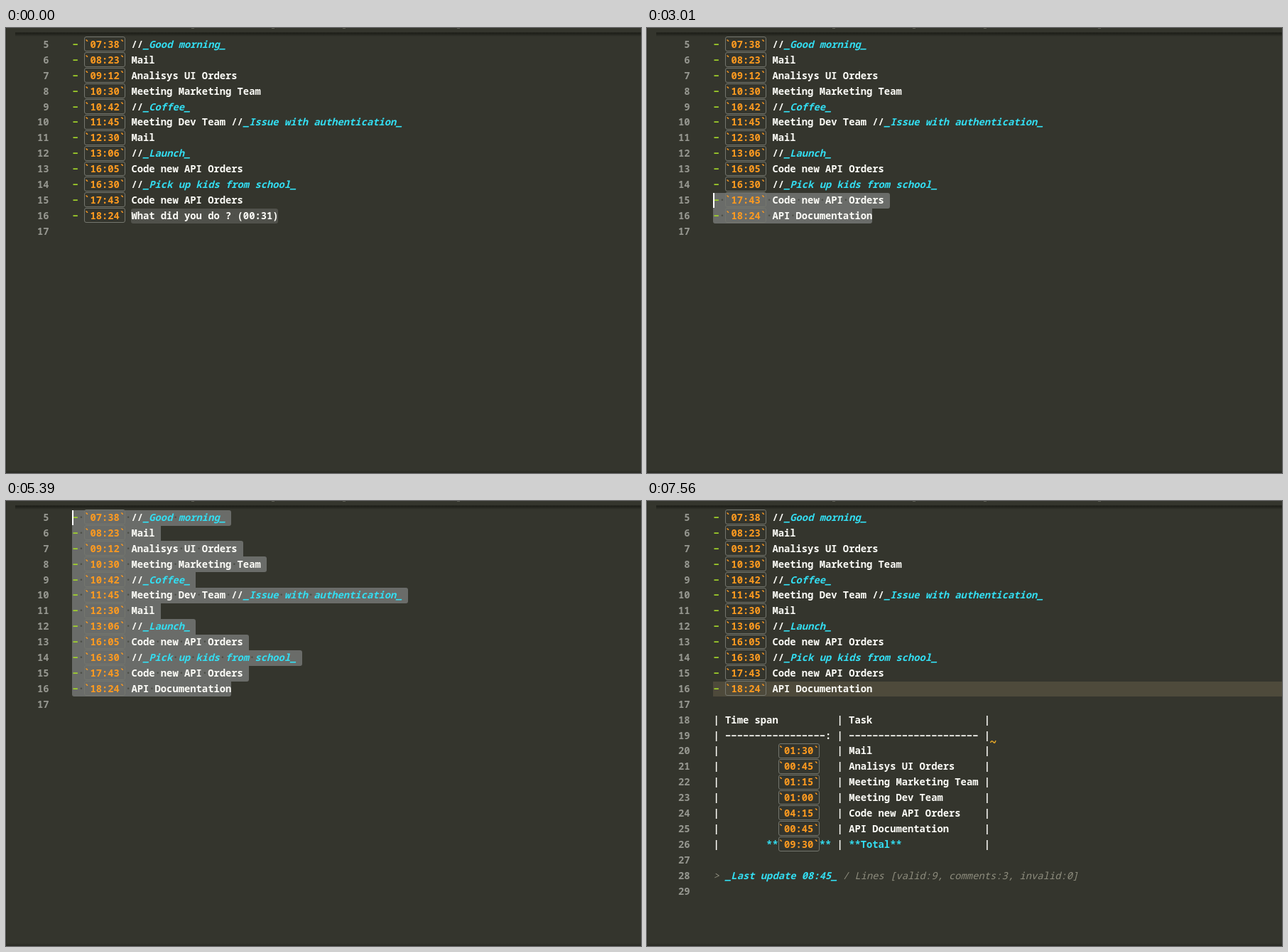
An HTML page for the animation above (8 s loop, 894x626 px).

```html
<!DOCTYPE html>
<html lang="en">
<head>
<meta charset="utf-8">
<title>Timesheet editor</title>
<style>
  html, body { margin: 0; width: 100%; height: 100%; overflow: hidden; background: #34352d; }
  #stage { position: relative; width: 894px; height: 626px; overflow: hidden; background: #34352d; }
  #stage div, #stage svg { position: absolute; }
  #text, #marks { inset: 0; }
  .line, .num, .dots {
    font: 600 13.82px/21.9px "Noto Sans Mono", monospace;
    height: 21.9px; white-space: pre; color: #fcfcf7;
    font-variant-ligatures: none;
  }
  .line, .dots { left: 93.5px; }
  .num { left: 0; width: 60.5px; text-align: right; color: #969790; }
  .dots { color: #4d4f48; }
  .code { position: relative; color: #fd9a20; }
  .code::before {
    content: ""; position: absolute; inset: -.6px 0 -1.4px;
    border: 1px solid #74766e; border-radius: 3px;
  }
  .note { color: #33def2; font-style: italic; }
  .bold { color: #33def2; }
  .dash { color: #a2d42a; }
  .quote { color: #8e8d7e; font-style: italic; font-weight: 500; }
  .quote .note { font-weight: 600; }
  .sel { background: #6a6c69; }
  .dim .sel { background: #50514b; }
  .current { left: 93px; right: 0; height: 21.5px; background: #4e4a3b; }
  .cursor { width: 2px; height: 21.5px; background: #fff; }

  .shadow { left: 13px; right: 0; top: 6px; height: 6px; background: linear-gradient(#25261f, #1f201a 30%, #34352d); }
  .foot { left: 0; right: 0; bottom: 0; height: 4px; background: linear-gradient(#34352d, #282922); }
  .edge { left: 0; top: 0; bottom: 0; width: 1px; background: #2b2c25; }
  .tail { top: 0; width: 4px; height: 1px; background: #5c5d54; }

  #palette {
    left: 266px; top: -40px; width: 660px; height: 368px;
    background: #262721; box-shadow: 0 4px 6px 2px #0c0d0a;
  }
  .item {
    left: 0; right: 0; height: 28.35px; padding-left: 15px;
    font: 450 16.4px/29.6px Inter, "Open Sans", sans-serif; letter-spacing: -.36px;
    color: #e2e2de; white-space: pre;
  }
  .item.on { background: #595a4f; }
  .key { top: 20px; height: 26px; width: 28px; border-radius: 4px; background: #48493f; }
</style>
</head>
<body>
<div id="stage">
  <div class="edge"></div>
  <div class="foot"></div>
  <div class="shadow"></div>
  <div id="marks"></div>
  <div id="text"></div>
  <div class="cursor" id="cursor"></div>
  <svg id="squiggle" width="894" height="626" fill="none" stroke="#e0a428" stroke-width="1.5">
    <path d="M483.500 340q2-4 4-1t3.500-2"/>
  </svg>
  <div id="palette"></div>
</div>
<script>
const LOOP = 8000, CHAR = 8.292, LEFT = 93.5, ROW = 21.9, FIRST = 5, LAST = 16;
const $ = id => document.getElementById(id);
const rowTop = n => 12.6 + (n - FIRST) * ROW;
const colX = c => LEFT + c * CHAR;

const log = [
  "07:38` //_Good morning_",
  "08:23` Mail",
  "09:12` Analisys UI Orders",
  "10:30` Meeting Marketing Team",
  "10:42` //_Coffee_",
  "11:45` Meeting Dev Team //_Issue with authentication_",
  "12:30` Mail",
  "13:06` //_Launch_",
  "16:05` Code new API Orders",
  "16:30` //_Pick up kids from school_",
  "17:43` Code new API Orders"
].map(s => "- `" + s);
const asked = "- `18:24` What did you do ? (00:31)";
const answered = "- `18:24` API Documentation";

const tableRow = (a, b) => "| " + a.padEnd(18) + " | " + b.padEnd(22) + " |";
const span = (time, task) => tableRow(" ".repeat(9) + "`" + time + "`", task);
const report = [
  "",
  tableRow("Time span", "Task"),
  tableRow("-".repeat(17) + ":", "-".repeat(22)),
  span("01:30", "Mail"),
  span("00:45", "Analisys UI Orders"),
  span("01:15", "Meeting Marketing Team"),
  span("01:00", "Meeting Dev Team"),
  span("04:15", "Code new API Orders"),
  span("00:45", "API Documentation"),
  tableRow(" ".repeat(7) + "**`09:30`**", "**Total**"),
  "",
  "> _Last update 08:45_ / Lines [valid:9, comments:3, invalid:0]",
  ""
];

const commands = [
  "Markdown: Open Preview", "My time: Summary", "My time: New Task", "My time: New Day",
  "Extensions: Install Extensions", "My time: New Break", "Format Document",
  "JSON Tools: Pretty JSON", "Simple Timesheet : Calculate",
  "Open New External Terminal", "Terminal: Rename", "Insert Time"
];

const box = (cls, style, body = "") => `<div class="${cls}" style="${style}">${body}</div>`;

function paint(s) {
  const html = s
    .replace(/`[^`]+`/g, '<span class="code">$&</span>')
    .replace(/_[^_]+_/g, '<span class="note">$&</span>')
    .replace(/\*\*(Total\*\*)?/g, '<span class="bold">$&</span>')
    .replace(/^- /, '<span class="dash">-</span> ')
    .replace(/^> /, "&gt; ")
    .replace(/-(?=[-:<]| \|)/g, "\u2212");
  return s[0] === ">" ? `<span class="quote">${html}</span>` : html;
}

function drawText(lines) {
  $("text").innerHTML = lines.map((s, i) => {
    const top = `top:${rowTop(FIRST + i) - .7}px`;
    return box("num", top, FIRST + i) + box("line", top, paint(s));
  }).join("");
}

// Whitespace inside the selection shows as faint dots.
const dots = (s, top, from) => box("dots", `top:${top - .7}px`,
  [...s].map((c, i) => c === " " && i >= from ? "\u00b7" : " ").join(""));

function selection(lines, top, from) {
  const width = n => n < top || n > LAST ? 0 : lines[n - FIRST].length + (n < LAST ? 1 : 0);
  let html = "";
  for (let n = top; n <= LAST; n++) {
    const w = width(n), y = rowTop(n);
    const round = [n === top, width(n - 1) < w, width(n + 1) < w, n === LAST];
    const radius = round.map(r => r ? "3px" : "0").join(" ");
    html += box("sel", `left:${colX(from) - .3}px;top:${y}px;width:${(w - from) * CHAR}px;` +
      `height:${ROW + (n < LAST ? .2 : -.4)}px;border-radius:${radius}`);
    html += dots(lines[n - FIRST], y, from);
  }
  return html;
}

function drawPalette(active) {
  $("palette").innerHTML = commands.map((c, i) =>
    box("item" + (i === active ? " on" : ""), `top:${48.8 + (i - 1) * 28.35}px`, c)).join("") +
    [546, 581, 614].map(x => box("key", `left:${x}px`)).join("");
}

const steps = [3010, 3570, 3640, 3710, 3780, 3850, 3990, 4060, 4130, 4200, 4340];
const within = (t, ...spans) => spans.some(([a, b]) => t >= a && t < b);

function stateAt(t) {
  const picking = within(t, [2800, 7070]);
  return {
    asking: t < 2170,
    selected: t < 2170 || picking,
    dim: t < 1050 || t >= 5810,
    top: picking ? LAST - steps.filter(s => t >= s).length : LAST,
    cursor: within(t, [1050, 1540], [2100, 2660], [2800, 4900], [5390, 5810], [7070, 7560]),
    palette: within(t, [5810, 7070]),
    active: t < 6300 ? 0 : 1,
    table: t >= 7070,
    squiggle: t >= 7210
  };
}

function draw(s) {
  const lines = [...log, s.asking ? asked : answered];
  drawText([...lines, ...(s.table ? report : [""])]);
  $("marks").className = s.dim ? "dim" : "";
  $("marks").innerHTML = s.selected
    ? selection(lines, s.top, s.asking ? 10 : 0)
    : box("current", `top:${rowTop(LAST)}px`);
  const col = s.selected && !s.asking ? 0 : lines[LAST - FIRST].length;
  const cursor = $("cursor").style;
  cursor.left = colX(col) - .5 + "px";
  cursor.top = rowTop(s.top) + "px";
  cursor.display = s.cursor ? "" : "none";
  $("squiggle").style.display = s.squiggle ? "" : "none";
  $("palette").style.display = s.palette ? "" : "none";
  drawPalette(s.active);
}

// Descenders of the heading just above the visible area.
[261, 374, 474, 635].forEach(x =>
  $("marks").insertAdjacentHTML("beforebegin", box("tail", `left:${x}px`)));

let shown = "";
function tick() {
  const state = stateAt(performance.now() % LOOP), key = JSON.stringify(state);
  if (key !== shown) draw(state);
  shown = key;
  requestAnimationFrame(tick);
}
tick();
</script>
</body>
</html>
```
